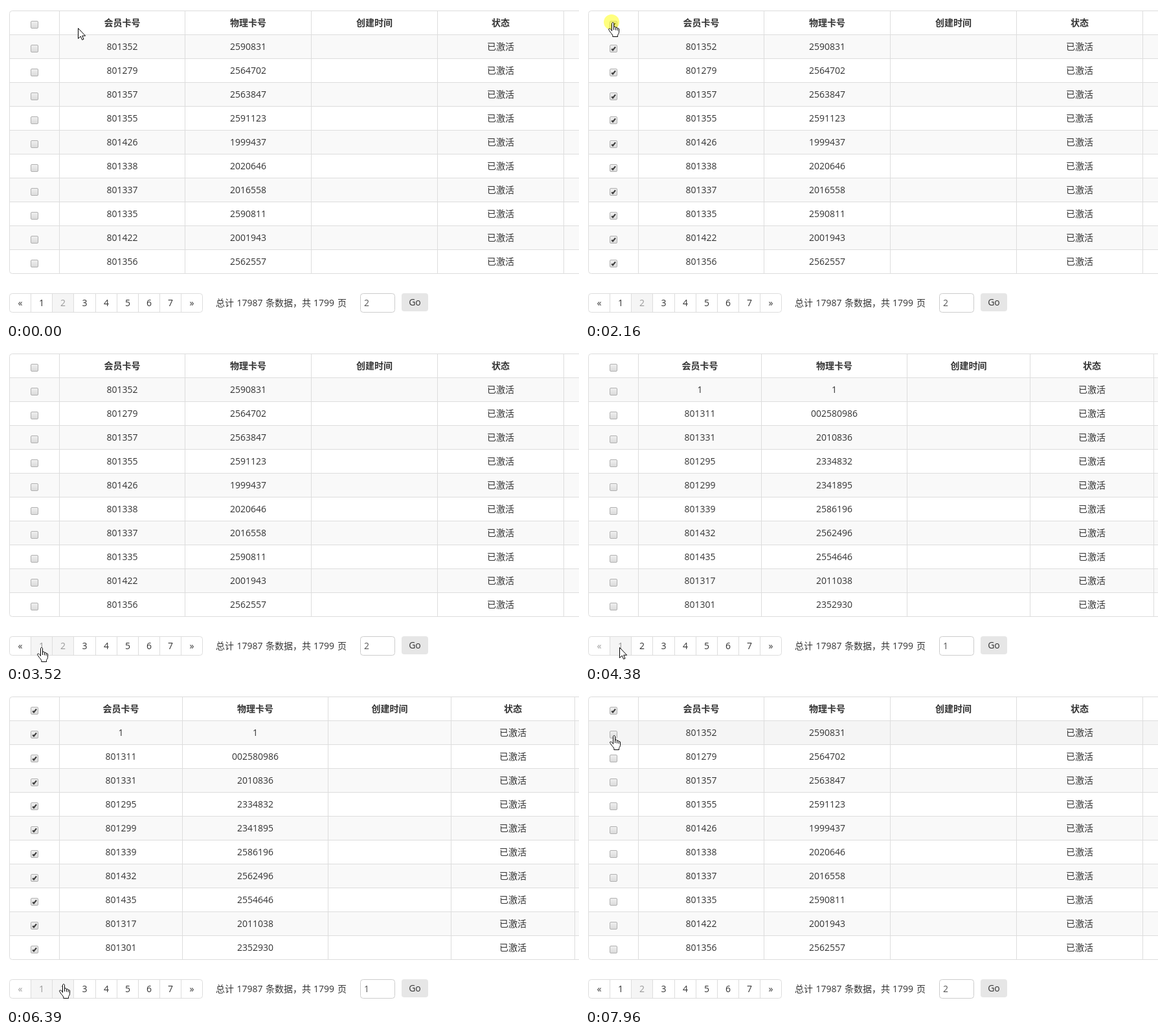
An HTML page that plays this animation: 885 by 488 pixels, repeating every 7990 ms.

```html
<!DOCTYPE html>
<html lang="zh-CN">
<head>
<meta charset="utf-8">
<title>会员卡列表</title>
<style>
  html, body { margin: 0; width: 100%; height: 100%; overflow: hidden; background: #fff; }
  svg { display: block; width: 100vw; height: 100vh; }
  text { font: 14px "Open Sans", "Noto Sans CJK SC", "Noto Sans CJK", sans-serif; fill: #333; }
  .mid { text-anchor: middle; }
  .head { font-weight: 700; }
  .line { stroke: #ddd; fill: none; }
</style>
</head>
<body>
<svg id="stage" viewBox="0 0 885 488">
  <defs>
    <linearGradient id="face" x2="0" y2="1">
      <stop offset="0" stop-color="#f0f0f0"/>
      <stop offset="1" stop-color="#dadada"/>
    </linearGradient>
  </defs>
</svg>
<script>
const LOOP = 7990, ROW = 37, TOP = 8;
const NS = 'http://www.w3.org/2000/svg';
const stage = document.getElementById('stage');

function add(parent, tag, attrs = {}, content) {
  const el = document.createElementNS(NS, tag);
  for (const key in attrs) el.setAttribute(key, attrs[key]);
  if (content !== undefined) el.textContent = content;
  parent.appendChild(el);
  return el;
}
const label = (parent, x, y, str, cls = 'mid') =>
  add(parent, 'text', { x, y, class: cls }, str);
const show = (el, on) => el.setAttribute('display', on ? 'inline' : 'none');

const heads = ['会员卡号', '物理卡号', '创建时间', '状态'];
const pages = {
  1: {
    cols: [82.5, 272.5, 497.5, 687.5, 878.5],
    cards: '1 801311 801331 801295 801299 801339 801432 801435 801317 801301',
    chips: '1 002580986 2010836 2334832 2341895 2586196 2562496 2554646 2011038 2352930'
  },
  2: {
    cols: [82.5, 276.5, 471.5, 666.5, 861.5],
    cards: '801352 801279 801357 801355 801426 801338 801337 801335 801422 801356',
    chips: '2590831 2564702 2563847 2591123 1999437 2020646 2016558 2590811 2001943 2562557'
  }
};

// Table frame
const rows = [], boxes = [];
for (let i = 1; i <= 10; i++)
  rows[i] = add(stage, 'rect', { x: 6, y: TOP + i * ROW, width: 879, height: ROW });
add(stage, 'path', { class: 'line', fill: 'none', d: 'M885 7.5H9.5Q5.5 7.5 5.5 11.5V410.5Q5.5 414.5 9.5 414.5H885' });
for (let i = 1; i <= 10; i++)
  add(stage, 'path', { class: 'line', d: `M6 ${TOP + i * ROW - 0.5}H885` });

for (const n in pages) {
  const page = pages[n], g = page.group = add(stage, 'g');
  const cards = page.cards.split(' '), chips = page.chips.split(' ');
  const mid = k => (page.cols[k] + page.cols[k + 1]) / 2;
  page.cols.forEach(x => add(g, 'path', { class: 'line', d: `M${x} 8V414` }));
  heads.forEach((h, k) => label(g, mid(k), 31, h, 'mid head'));
  cards.forEach((card, i) => {
    const y = 68 + i * ROW;
    label(g, mid(0), y, card);
    label(g, mid(1), y, chips[i]);
    label(g, mid(3), y, '已激活');
  });
}

for (let i = 0; i <= 10; i++) {
  const g = add(stage, 'g', { transform: `translate(38 ${23 + i * ROW})` });
  add(g, 'rect', { x: 0.5, y: 0.5, width: 11, height: 11, rx: 1.5, fill: 'url(#face)', stroke: '#b0b0b0' });
  boxes[i] = add(g, 'path', {
    d: 'M3.2 6.4L5 8.4L9 3.4', fill: 'none', stroke: '#3c3c3c', 'stroke-width': 2.2
  });
}

// Pager
const links = [...'«1234567»'].map((str, i) => {
  const x = 5.5 + Math.round(i * 33.15), w = 5.5 + Math.round((i + 1) * 33.15) - x;
  return {
    x, w,
    back: add(stage, 'rect', { x, y: 446, width: w, height: 29 }),
    text: label(stage, x + w / 2, 465, str)
  };
});
links.slice(1).forEach(l => add(stage, 'path', { class: 'line', d: `M${l.x} 446V474` }));
add(stage, 'rect', { class: 'line', x: 5.5, y: 445.5, width: 298, height: 29, rx: 4 });

[[324, '总计'], [356.5, '17987'], [401, '条数据，共'], [475, '1799'], [512, '页']]
  .forEach(([x, str]) => label(stage, x, 465, str, ''));
add(stage, 'rect', { x: 547.5, y: 445.5, width: 53, height: 29, rx: 4, fill: '#fff', stroke: '#ccc' });
const field = label(stage, 553, 465, '', '');
field.style.fill = '#555';
add(stage, 'rect', { x: 611, y: 445, width: 41, height: 28, rx: 4, fill: '#e6e6e6' });
label(stage, 631.5, 464, 'Go');

// Pointer
const glow = add(stage, 'circle', { r: 12, fill: '#ff0', opacity: 0.5 });
const ink = { fill: '#fff', stroke: '#000', 'stroke-linejoin': 'round' };
const arrow = add(stage, 'path', {
  ...ink, d: 'M.5 .5V16.5L4.2 13L6.6 18.4L9 17.4L6.7 12.2H11.6Z'
});
const hand = add(stage, 'g');
add(hand, 'path', {
  ...ink,
  d: 'M5.5 13.5V2.2C5.5 0 8.5 0 8.5 2.2V8C8.7 6.5 11.3 6.6 11.4 8.4V9C11.8 7.6 14 7.8 14.1 9.6V10.2' +
     'C14.5 9 16.5 9.3 16.5 11V15.5C16.5 18 14.5 18.8 14.5 20.5V22.5H6.8V20.5C6 18.5 3.5 16.5 2 13.8' +
     'C.9 12.2 .3 11.3 .6 10.6C1.6 9.4 3.6 10.2 5.5 13.5Z'
});
add(hand, 'path', { d: 'M8.5 8V12M11.4 9V12.5M14.1 10.2V13', stroke: '#000', fill: 'none' });

const inOut = p => p < 0.5 ? (2 * p) ** 2.1 / 2 : 1 - (2 - 2 * p) ** 2.1 / 2;
const flick = p => 1 - (1 - p) ** 4.75;

// start, end, bend point, end point, easing
const moves = [
  [390, 720, [74, 30], [38, 26], inOut],
  [1770, 1800, [40, 26], [41, 25], inOut],
  [2820, 3520, [44, 245], [53, 462], inOut],
  [4380, 4960, [96, 300], [39, 30.5], inOut],
  [5860, 6470, [50, 250], [89, 465], inOut],
  [6560, 6670, [89, 466], [90, 466], inOut],
  [7350, 7960, [95, 150], [43, 67], flick]
];
const clicks = [[1010, 1160], [2160, 2360], [3800, 3880], [5110, 5300], [6670, 6750]];

function pointer(t) {
  let from = [111, 34];
  for (const [start, end, bend, to, ease] of moves) {
    if (t < start) break;
    if (t < end) {
      const s = ease((t - start) / (end - start)), r = 1 - s;
      return from.map((v, k) => r * r * v + 2 * r * s * bend[k] + s * s * to[k]);
    }
    from = to;
  }
  return from;
}

const within = (t, a, b) => t >= a && t < b;

function draw(t) {
  const page = within(t, 4030, 6900) ? 1 : 2;
  const headOn = within(t, 1110, 2310) || t >= 5240;
  const rowsOn = headOn && t < 6900;
  const [x, y] = pointer(t).map(Math.round);

  for (const n in pages) show(pages[n].group, +n === page);
  boxes.forEach((box, i) => show(box, i ? rowsOn : headOn));

  // Row highlight trails the pointer slightly
  const over = Math.floor((pointer(Math.max(0, t - 25))[1] - TOP) / ROW);
  for (let i = 1; i <= 10; i++)
    rows[i].setAttribute('fill', i === over ? '#f5f5f5' : i % 2 ? '#f9f9f9' : '#fff');

  let onLink = false;
  links.forEach((l, i) => {
    const active = i === page, off = i === 0 && page === 1;
    const hover = within(y, 445, 475) && within(x, l.x, l.x + l.w);
    if (hover && !active && !off) onLink = true;
    l.back.setAttribute('fill', active || (hover && !off) ? '#f5f5f5' : 'none');
    l.text.style.fill = active || hover || off ? '#999' : '#333';
  });
  field.textContent = page;

  const boxY = (y - 23) % ROW;
  const onBox = within(x, 38, 51) && within(y, 23, 406) && boxY <= 12;
  const isHand = onLink || onBox;
  show(hand, isHand);
  show(arrow, !isHand);
  hand.setAttribute('transform', `translate(${x - 5} ${y})`);
  arrow.setAttribute('transform', `translate(${x} ${y})`);
  show(glow, clicks.some(([a, b]) => within(t, a, b)));
  glow.setAttribute('cx', x);
  glow.setAttribute('cy', y);
}

const begin = performance.now();
function tick() {
  draw((performance.now() - begin) % LOOP);
  requestAnimationFrame(tick);
}
tick();
</script>
</body>
</html>
```
